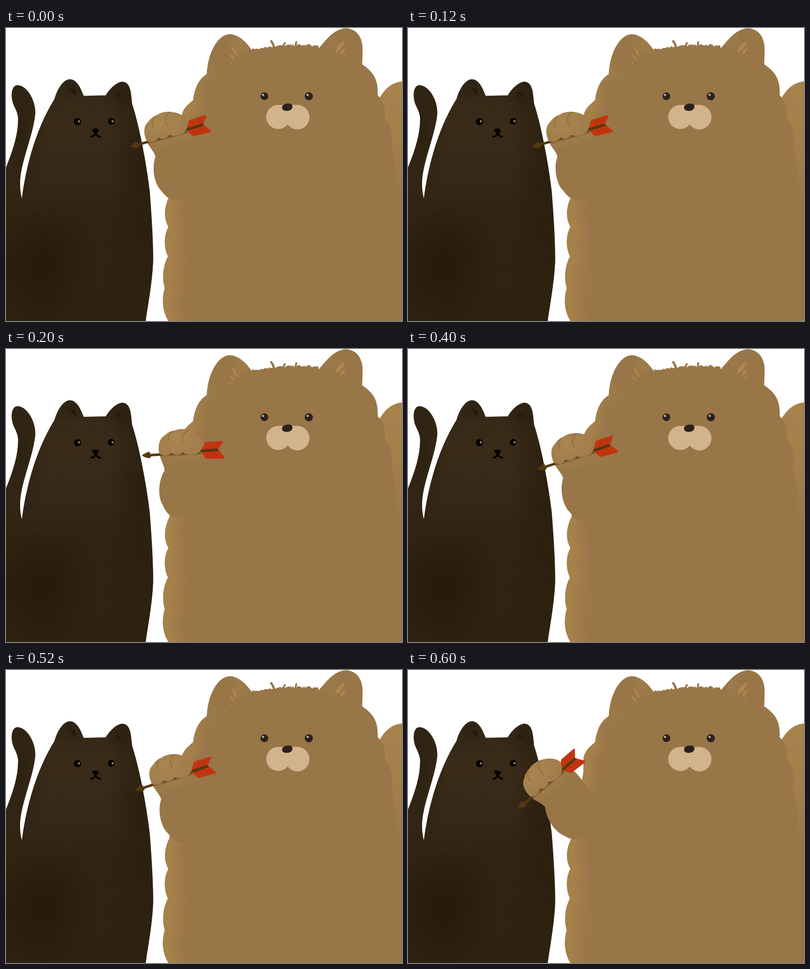
These frames come from a looping animation (869x644 px, 0.8 s). An HTML page with a canvas:

```html
<!DOCTYPE html>
<html lang="en">
<head>
<meta charset="utf-8">
<title>Cat, bear and arrow</title>
<style>
html, body { margin: 0; width: 100%; height: 100%; overflow: hidden; background: #fff; }
canvas { display: block; }
</style>
</head>
<body>
<canvas id="stage" width="869" height="644"></canvas>
<script>
const W = 869, H = 644, HOLD = 200;
const ctx = document.getElementById('stage').getContext('2d');
const FUR = '#987648', LIGHT = '#a8824b', WOOD = '#55380f', RED = '#c4340f';

// Arrow tip position and arm turn in degrees
const poses = [
  { x: 272, y: 261, turn: 12.5 },
  { x: 298, y: 234, turn: 0 },
  { x: 284, y: 264, turn: 14 },
  { x: 241, y: 305, turn: 36.9 }
];
const PIVOT = poses[1];

const catShape = new Path2D(`M0 308 C16 268 28 232 27 197 C25 176 12 170 13 145
  C14 131 19 126 26 126 C45 128 63 155 64 186 C61 225 42 270 34 310
  C28 338 30 360 35 377 C42 318 62 228 107 156 C111 140 124 113 141 113
  C156 114 164 134 170 149.5 L219 148.5 C228 134 243 118 257 118.5
  C273 121 274 142 276 166 C291 212 307 292 315 360 C320 425 322.5 470 322.5 510
  C321 560 311 606 306 644 H0Z`);

const bearLeft = `M357 644 C343 622 342 594 349 572 C343 552 344 524 356 502
  C346 482 347 455 357 437 C346 418 347 394 359 370 C366 330 376 280 383 238
  C388 222 384 208 386 192 C390 175 401 168 411 159 C414 133 424 111 441 102`;
const bearEdge = new Path2D(bearLeft);
const bearShape = new Path2D(bearLeft + ` C443 60 462 15 492 14
  C514 16 530 35 541 52 Q560 45 600 42 Q650 38 687 45 C702 27 720 2 746 1
  C773 3 783 25 782 52 L781 80 C805 96 817 113 815 148
  C829 162 833 180 830 197 C845 213 849 237 845 264 C854 290 855 325 852 360
  L869 372 V644Z`);
const backShape = new Path2D('M818 158 C832 131 851 119 869 118 V400 H835Z');

const armShape = new Path2D(`M337 232 C332 210 338 195 350 189 C359 179 372 180 376 177
  C397 173 420 183 431 199 Q441 222 447 245 Q450 271 447 303
  C440 345 415 371 376 370.5 C359 370 351 359 343.5 342
  C333 325 333.5 290 348 267 C347 254 339 244 337 232Z`);
const fingers = new Path2D(`M337 230 C333 209 338 195 350 189 C359 179 372 180 376 177
  C397 173 420 183 431 199 Q437 213 426 225 C418 234 397 235 388 227
  C382 234 369 234 363 228 C356 236 343 236 337 230Z`);

let seed = 7;
function rand() {
  seed = (seed * 16807) % 2147483647;
  return seed / 2147483647;
}

function fill(shape, color) {
  ctx.fillStyle = color;
  ctx.fill(shape);
}

// Fill with a slightly heavier edge
function body(shape, color) {
  fill(shape, color);
  ctx.strokeStyle = color;
  ctx.lineWidth = 1.2;
  ctx.stroke(shape);
}

function poly(color, ...pts) {
  ctx.beginPath();
  for (const [x, y] of pts) ctx.lineTo(x, y);
  ctx.closePath();
  ctx.fillStyle = color;
  ctx.fill();
}

function oval(x, y, rx, ry, color, turn = 0) {
  ctx.beginPath();
  ctx.ellipse(x, y, rx, ry, turn, 0, Math.PI * 2);
  ctx.fillStyle = color;
  ctx.fill();
}

function stroke(path, color, width) {
  ctx.strokeStyle = color;
  ctx.lineWidth = width;
  ctx.stroke(new Path2D(path));
}

// Soft elliptical shade; rgb is "r,g,b"
function shade(x, y, rx, ry, rgb, alpha) {
  ctx.save();
  ctx.translate(x, y);
  ctx.scale(rx, ry);
  const g = ctx.createRadialGradient(0, 0, 0, 0, 0, 1);
  g.addColorStop(0, `rgba(${rgb},${alpha})`);
  g.addColorStop(0.5, `rgba(${rgb},${alpha * 0.55})`);
  g.addColorStop(1, `rgba(${rgb},0)`);
  ctx.fillStyle = g;
  ctx.fillRect(-1, -1, 2, 2);
  ctx.restore();
}

function vertical(y0, y1, ...colors) {
  const g = ctx.createLinearGradient(0, y0, 0, y1);
  colors.forEach((c, i) => g.addColorStop(i / (colors.length - 1), c));
  return g;
}

function eye(x, y, r, color, gx, gy, glint) {
  oval(x, y, r, r, color);
  oval(x + gx, y + gy, 2.5, 2.5, glint);
}

function drawCat() {
  body(catShape, vertical(110, 520, '#342817', '#392b18', '#372918', '#302311', '#2d2110'));
  ctx.save();
  ctx.clip(catShape);
  shade(30, 220, 60, 190, '40,30,14', 0.7);
  shade(300, 300, 75, 260, '40,29,14', 0.8);
  shade(255, 140, 50, 60, '37,28,15', 0.5);
  shade(140, 128, 40, 40, '40,30,17', 0.5);
  shade(85, 520, 120, 130, '35,25,9', 0.75);
  shade(200, 540, 110, 150, '52,39,21', 0.35);
  for (let i = 0; i < 140; i++) {
    const x = 50 + rand() * 260, y = 330 + rand() * 300;
    oval(x, y, 2 + rand() * 3, 1.2, i % 2 ? 'rgba(66,51,30,.18)' : 'rgba(28,20,8,.18)', -0.9);
  }
  ctx.restore();

  stroke('M142 133L149 137M145 139L154 147M149 135L152 141', '#1d140a', 2.2);
  stroke('M240 149L246 139M245 151L251 143', '#1d140a', 2.2);
  eye(157, 206, 8, '#050403', 3, -1, '#887c6c');
  eye(231, 205, 7.5, '#050403', 3, 0, '#887c6c');
  fill(new Path2D('M189 224 Q189 221 196 221 Q204 221 204 225 Q202 231 197 232 Q191 230 189 224Z'), '#050403');
  stroke('M196 229 Q196 238 187 239M196 230 Q199 238 207 239', '#050403', 4);
}

function drawTuft() {
  ctx.beginPath();
  ctx.moveTo(538, 60);
  for (let x = 540; x <= 687; x += 2.5) {
    const u = (x - 540) / 147;
    const base = 49 - 26 * u + 19 * u * u;
    ctx.lineTo(x, base - rand() * 5);
  }
  ctx.lineTo(690, 60);
  ctx.fillStyle = FUR;
  ctx.fill();
  stroke('M588 42Q586 34 582 29', FUR, 5);
  stroke('M608 41L612 33M635 40L637 31M663 40L664 37', FUR, 4);
}

function drawBear() {
  body(backShape, vertical(118, 380, LIGHT, '#a37f4b', FUR));
  body(bearShape, FUR);
  ctx.save();
  ctx.clip(bearShape);
  ctx.filter = 'blur(12px)';
  ctx.strokeStyle = LIGHT;
  ctx.lineWidth = 42;
  ctx.stroke(bearEdge);
  ctx.filter = 'none';
  shade(362, 520, 48, 200, '168,130,75', 0.5);
  shade(445, 125, 50, 75, '152,118,72', 0.85);
  shade(515, 35, 28, 30, '168,130,75', 0.5);
  shade(712, 32, 24, 26, '168,130,75', 0.35);
  for (let i = 0; i < 45; i++) {
    oval(352 + rand() * 32, 440 + rand() * 200, 2, 1, 'rgba(145,108,58,.25)', -0.8);
  }
  ctx.restore();
  drawTuft();

  const mark = '#ab874b';
  fill(new Path2D('M494 39 Q508 49 508 63 Q499 57 494 39Z'), mark);
  fill(new Path2D('M490 57 Q501 62 503 71 Q494 69 490 57Z'), mark);
  stroke('M490 74L494 77', mark, 2.5);
  fill(new Path2D('M744 28 Q726 33 723 54 Q739 47 744 28Z'), mark);
  fill(new Path2D('M745 43 Q734 48 733 59 Q744 56 745 43Z'), mark);
  stroke('M743 60L740 64', mark, 2.5);

  eye(567, 150, 8.5, '#2b211c', -3, -3, '#bbab92');
  eye(664.5, 150, 9, '#2b211c', -2.5, -3, '#bbab92');
  const muzzle = '#d1b48c';
  oval(597.5, 195.5, 26.5, 26.5, muzzle);
  oval(639.5, 196, 26.5, 27, muzzle);
  poly(muzzle, [597, 169], [639, 169], [639, 196], [618, 208], [597, 196]);
  fill(new Path2D('M606 177 C604 169 613 166 620 166 C629 166 631 173 626 179 C619 184 608 183 606 177Z'), '#2b211c');
}

function drawArm({ x, y, turn }) {
  ctx.save();
  ctx.translate(x, y);
  ctx.rotate(-turn * Math.PI / 180);
  ctx.translate(-PIVOT.x, -PIVOT.y);

  fill(armShape, FUR);
  ctx.save();
  ctx.clip(armShape);
  shade(390, 214, 95, 45, '170,136,82', 0.5);
  ctx.restore();

  // Shaft and the shadow below it
  stroke('M344 235L428 230.5', '#83633a', 3);
  stroke('M314 233.5L344 231.5', WOOD, 5.5);
  stroke('M344 230L424 226', '#68450f', 7);
  fill(new Path2D('M298 234 Q306 228 314 226 Q317 227 316 231 L318 236 Q318 240 313 240 Q305 239 298 234Z'), WOOD);

  fill(fingers, '#a07d4b');
  ctx.save();
  ctx.clip(fingers);
  shade(375, 195, 58, 42, '173,139,83', 0.65);
  ctx.restore();
  stroke('M365 181 Q355 189 357 202M400 179 Q383 186 388 206', '#937141', 2.6);

  poly(RED, [437, 206], [440, 204.5], [475, 202], [477, 204], [465, 221], [427, 224]);
  poly(RED, [426, 223], [466, 221], [479, 238], [478, 241], [438, 241.5]);
  stroke('M442 219L450 208M454 218L462 206M443 228L452 238M455 227L465 237', '#a53710', 1.8);
  stroke('M430 224L463 221.5', WOOD, 6);
  ctx.restore();
}

function drawScene(pose) {
  seed = 7;
  ctx.fillStyle = '#fff';
  ctx.fillRect(0, 0, W, H);
  ctx.lineCap = ctx.lineJoin = 'round';
  drawCat();
  drawBear();
  drawArm(pose);
}

const start = performance.now();
let shown = -1;
function tick() {
  const step = Math.floor((performance.now() - start) / HOLD) % poses.length;
  if (step !== shown) drawScene(poses[shown = step]);
  requestAnimationFrame(tick);
}
tick();
</script>
</body>
</html>
```
